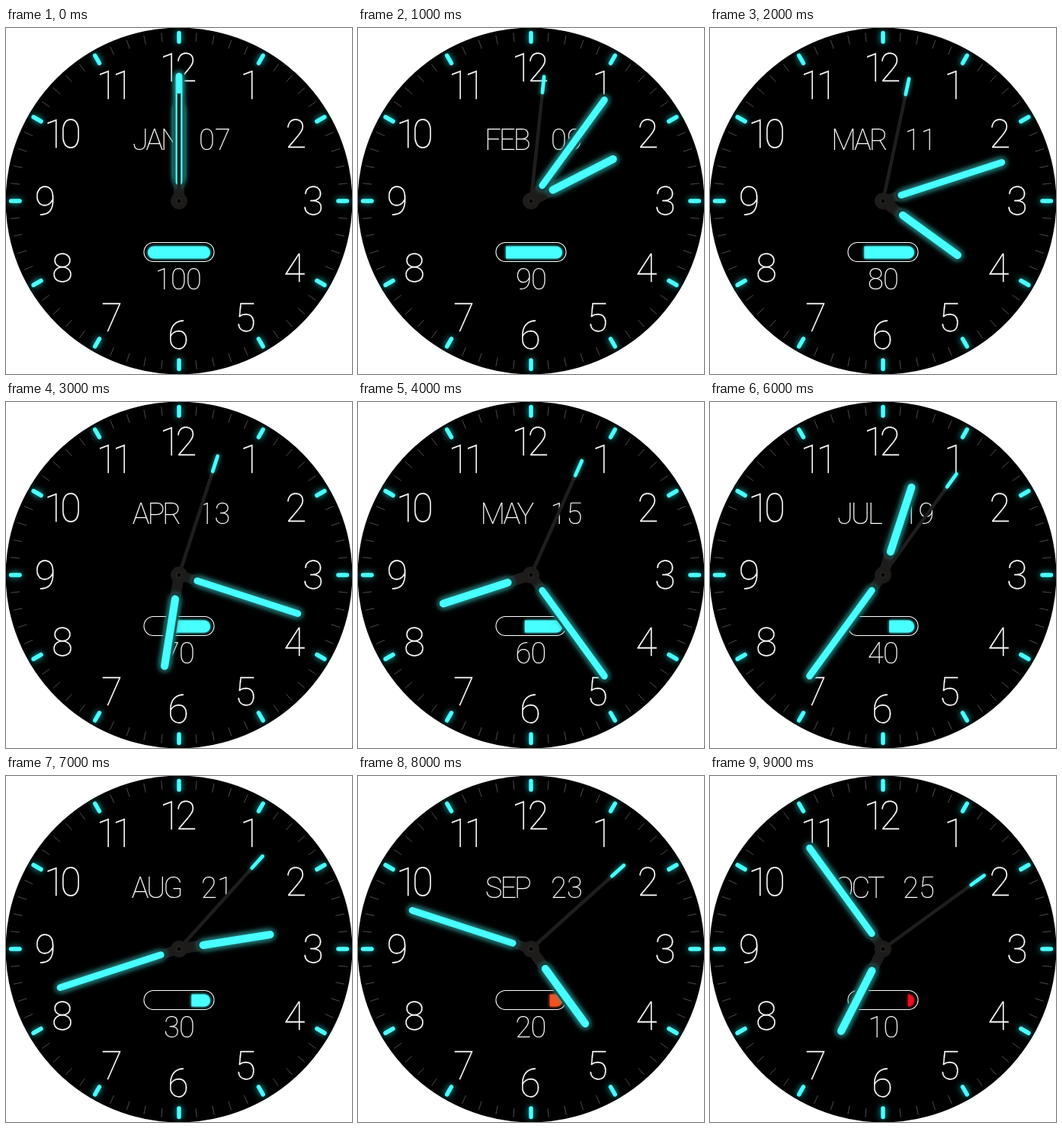
Animation of 454x454 px, one loop 10000 ms. Source, as an HTML page with a canvas:

```html
<!DOCTYPE html>
<html lang="en">
<head>
<meta charset="utf-8">
<title>Watch face</title>
<style>
  html, body { margin: 0; width: 100%; height: 100%; overflow: hidden; background: #fff; }
  canvas { display: block; }
</style>
</head>
<body>
<canvas id="face" width="454" height="454"></canvas>
<script>
const ctx = document.getElementById('face').getContext('2d');
const C = 227;
const CYAN = '#48ffff';
const BODY = '#1d1c1a';
const MONTHS = ['JAN', 'FEB', 'MAR', 'APR', 'MAY', 'JUN', 'JUL', 'AUG', 'SEP', 'OCT'];
// ink centre and baseline of the numerals 1 to 12
const NUMERALS = [
  [317.5, 93], [380.5, 157], [403, 245], [379.5, 333], [315, 398], [226.5, 421],
  [138.5, 398], [74, 333], [51, 245], [75, 157], [139.5, 93], [227, 70]
];

function glow(color, blur) {
  ctx.shadowColor = color;
  ctx.shadowBlur = blur;
}

// line along a ray from the centre, angle in degrees clockwise from 12
function ray(deg, from, to, width, color, cap = 'round') {
  const a = deg * Math.PI / 180;
  const dx = Math.sin(a), dy = -Math.cos(a);
  ctx.beginPath();
  ctx.moveTo(C + dx * from, C + dy * from);
  ctx.lineTo(C + dx * to, C + dy * to);
  ctx.lineWidth = width;
  ctx.lineCap = cap;
  ctx.strokeStyle = color;
  ctx.stroke();
}

function disc(r, color) {
  ctx.beginPath();
  ctx.arc(C, C, r, 0, Math.PI * 2);
  ctx.fillStyle = color;
  ctx.fill();
}

// text with its ink centred on x
function label(text, x, y, size, spacing = 0) {
  ctx.font = `100 ${size}px Roboto, Lato, sans-serif`;
  ctx.letterSpacing = spacing + 'px';
  ctx.fillStyle = ctx.strokeStyle = '#fff';
  ctx.lineWidth = size / 160;
  const m = ctx.measureText(text);
  const left = x - (m.actualBoundingBoxRight - m.actualBoundingBoxLeft) / 2;
  ctx.fillText(text, left, y);
  ctx.strokeText(text, left, y);
}

function dial() {
  ctx.fillStyle = '#fff';
  ctx.fillRect(0, 0, 454, 454);
  disc(C + 0.4, '#000');
  for (let i = 0; i < 60; i++) {
    if (i % 5) {
      ray(i * 6, 210, 222, 1, '#4c4c4c', 'butt');
    } else {
      glow('rgba(40,220,220,.9)', 9);
      ray(i * 6, 209, 220.5, 5.5, CYAN);
      glow('transparent', 0);
    }
  }
  NUMERALS.forEach(([x, y], i) => label(String(i + 1), x, y, 51, -7));
}

function battery(level) {
  ctx.beginPath();
  ctx.roundRect(181, 281.5, 92, 25, 12.5);
  ctx.lineWidth = 1.1;
  ctx.strokeStyle = '#fff';
  ctx.stroke();

  const color = level > 20 ? CYAN : level > 10 ? '#f4511e' : '#e8101c';
  const x = 268 - level * 0.82;
  const leftRadius = level === 100 ? 8 : 0;
  glow(color, 4);
  ctx.beginPath();
  ctx.roundRect(x, 286.5, 268 - x, 16, [leftRadius, 8, 8, leftRadius]);
  ctx.fillStyle = color;
  ctx.fill();
  glow('transparent', 0);
  label(String(level), level === 10 ? 228.5 : 227, 343, 38, -0.7);
}

function hand(deg, from, to, width) {
  ray(deg, 0, from, width + 4, BODY);
  glow('rgba(50,90,85,.6)', 5);
  ray(deg, from, to, width + 6, '#0d1312');
  glow('rgba(50,240,235,.9)', 10);
  ray(deg, from, to, width, CYAN);
  glow('transparent', 0);
}

function secondHand(deg) {
  ray(deg, 0, 142, 4.5, '#1e1e1e', 'butt');
  glow('rgba(50,220,220,.8)', 6);
  ray(deg, 143, 164, 4.7, CYAN);
  glow('transparent', 0);
}

function draw(step) {
  dial();
  label(MONTHS[step], 197, 160, 38, -3);
  label(String(7 + step * 2).padStart(2, '0'), 274, 160, 38);
  battery(100 - step * 10);
  hand(step * 63, 32, 121, 10);
  hand(step * 36, 25, 164, 8.7);
  secondHand(step * 6);
  disc(11, BODY);
  disc(4.5, '#232220');
  disc(2.2, '#000');
}

const start = performance.now();
function frame() {
  draw(Math.floor((performance.now() - start) / 1000) % 10);
  requestAnimationFrame(frame);
}
frame();
</script>
</body>
</html>
```
